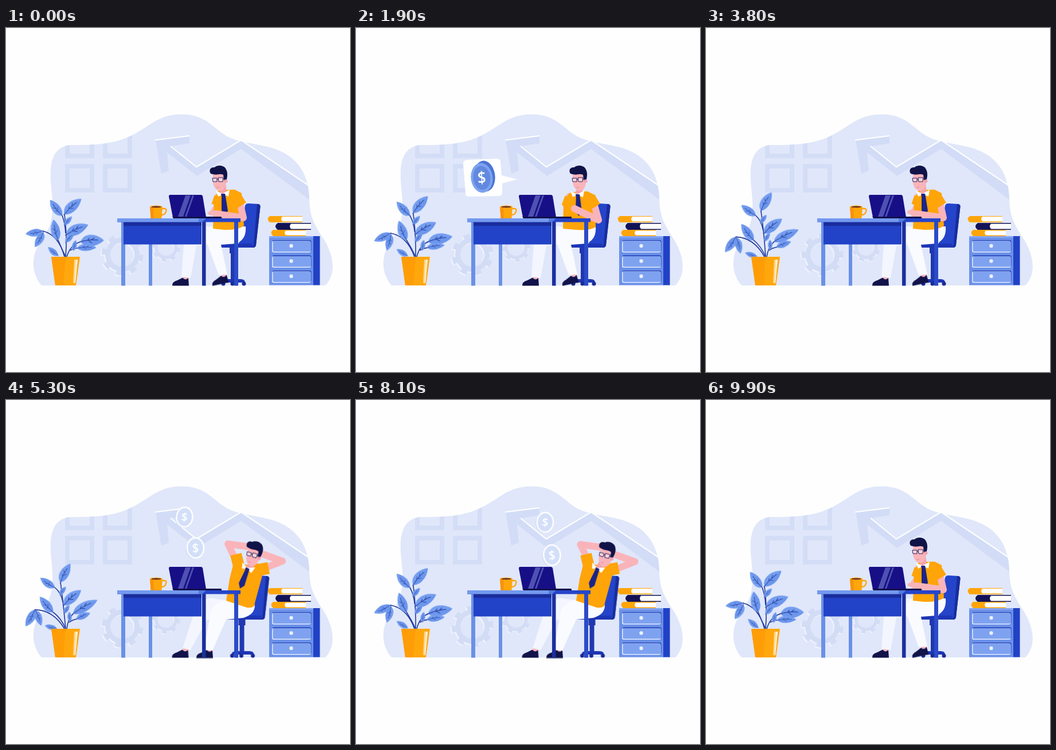
An HTML page without scripts for the animation above (10000 ms loop, 600 px wide and 600 px high).

```html
<!DOCTYPE html>
<html lang="en">
<head>
<meta charset="utf-8">
<title>Office desk</title>
<style>
html, body { margin: 0; width: 100%; height: 100%; overflow: hidden; background: #fefefe; }
svg { display: block; width: 100vw; height: 100vh; }
text { font-family: "Open Sans", Lato, sans-serif; font-weight: 600; text-anchor: middle; fill: #fff; }

/* a = typing, b = thinking, c = leaning back */
.shape { animation: shape 10s ease-in-out infinite; }
.move { animation: move 10s ease-in-out infinite; }
@keyframes shape {
  0%, 12%, 37%, 43%, 95%, to { d: var(--a); }
  16%, 33% { d: var(--b, var(--a)); }
  48%, 90% { d: var(--c); }
}
@keyframes move {
  0%, 12%, 37%, 43%, 95%, to { transform: var(--a, translate(0) rotate(0)); }
  16%, 33% { transform: var(--b, var(--a, translate(0) rotate(0))); }
  48%, 90% { transform: var(--c); }
}
.drift { animation: drift 10s ease-in-out infinite; }
@keyframes drift {
  0%, 50%, 95%, to { transform: none; }
  81%, 90% { transform: translate(4.5px, 1px); }
}
.typing { animation: typing 10s linear infinite; }
@keyframes typing {
  0%, 12%, 37%, 43%, 95%, to { opacity: 1; }
  13%, 36%, 44%, 94% { opacity: 0; }
}
.finger { animation: finger .2s ease-in-out infinite alternate; }
.finger + .finger { animation-delay: -.2s; }
@keyframes finger { to { transform: translate(-1px, -2px); } }
.tap { transform-origin: 317px 446px; animation: tap 10s ease-in-out infinite; }
@keyframes tap {
  0%, 53%, 61%, 69%, 77%, 81%, 90%, to { transform: none; }
  57%, 65%, 73%, 86% { transform: rotate(28deg); }
}

.sway, .stem { animation: sway 5s cubic-bezier(.37, 0, .63, 1) infinite alternate; }
.stem { animation-name: bend; }
@keyframes sway { from { transform: var(--a); } to { transform: var(--b); } }
@keyframes bend { from { d: var(--a); } to { d: var(--b); } }

.spin { animation: spin 10s linear infinite; }
.back { animation-direction: reverse; }
@keyframes spin { to { transform: rotate(90deg); } }

.bubble { transform-origin: 280px 264px; animation: bubble 10s ease-out infinite; }
@keyframes bubble {
  0%, 13%, 37%, to { transform: scale(0); }
  16.5%, 34% { transform: scale(1); }
}
.turn { animation: turn 1s ease-in-out infinite alternate; }
@keyframes turn { from { transform: scaleX(.9); } to { transform: scaleX(1); } }

.coin { opacity: 0; animation: rise 10s linear infinite; }
@keyframes rise {
  0% { opacity: 0; transform: translate(var(--x), 296px) scale(.6) rotate(-8deg); }
  1.5% { opacity: 1; transform: translate(calc(var(--x) + var(--dx) * .136), 278.8px) scale(1.05) rotate(-5deg); }
  9% { opacity: 1; }
  11%, to { opacity: 0; transform: translate(calc(var(--x) + var(--dx)), 170px) scale(.98) rotate(10deg); }
}
</style>
</head>
<body>
<svg viewBox="0 0 600 600">
<defs>
  <path id="blob" d="M62 449C48 433 45 413 50 394C56 372 76 360 80 328C84 296 76 275 78 246C80 220 92 204 116 204C152 204 186 204 220 187C250 172 266 150.500 306 150.500C352 150.500 362 178 390 191C418 204 456 201 487 219C516 236 528 264 529 298C530 330 537 340 550 362C570 390 579 426 557 449Z"/>
  <clipPath id="clip"><use href="#blob"/></clipPath>
  <g id="gear" fill="none">
    <circle r="25.500" stroke-width="9"/>
    <circle r="32.500" stroke-width="8" pathLength="16" stroke-dasharray=".9 1.1"/>
  </g>
  <g id="leaf">
    <path d="M0 0C6-13 26-13 40 0C28 9 10 11 0 0Z" fill="#759eef"/>
    <path d="M0 0Q20-3 40 0C28 9 10 11 0 0Z" fill="#6c96ec"/>
    <path d="M-2 0Q14-3 30-1M11-1L16-5M19-2L24-5M14-1L19 3" fill="none" stroke="#213a9c"/>
  </g>
  <g id="shoe">
    <path d="M309 431L318 433L318 442L309 442Z" fill="#f9b4ba"/>
    <path d="M290 449.500Q289 443 299 440L308 435.500Q313 441 318 436L319 449.500Z" fill="#11134a"/>
  </g>
  <g id="drawer">
    <rect x="464.500" y="370" width="68" height="20" rx="3" fill="#2540b4"/>
    <rect x="464" y="371.500" width="67.500" height="20" rx="3" fill="#e3ecfe"/>
    <rect x="465.500" y="371.500" width="66" height="18.500" rx="2" fill="#7fa2f0"/>
    <circle cx="497.500" cy="380" r="3.200" fill="#e9f0ff"/>
  </g>
  <g id="money">
    <ellipse cx="-1.500" cy="1" rx="14.500" ry="17.500" fill="#c5d3f4"/>
    <ellipse rx="14" ry="17" fill="#d3dff8" stroke="#fff" stroke-width="2.400"/>
    <text y="7" font-size="20">$</text>
  </g>
</defs>

<rect width="600" height="600" fill="#fefefe"/>
<use href="#blob" fill="#e0e7fa"/>
<g clip-path="url(#clip)">
  <g fill="none" stroke="#d3ddf6" stroke-width="8">
    <rect x="107" y="241" width="43" height="42"/>
    <rect x="173" y="241" width="43" height="42"/>
    <rect x="107" y="181" width="43" height="42"/>
    <rect x="173" y="181" width="43" height="42"/>
  </g>
  <path d="M261 196L320 189V201L290 206L332 243L410 196L530 276V300L410 211L333 258L281 217L284 249L271 254Z" fill="#d2dcf6"/>
  <path d="M260 195.500L320 188M287 206L332 242.500L410 195.500L530 276" fill="none" stroke="#fff" stroke-width="2.200"/>
</g>
<g transform="translate(201.500 397)" stroke="#f4f7ff"><use class="spin" href="#gear"/></g>
<g transform="translate(203 395.500)" stroke="#d3dcf5"><use class="spin" href="#gear"/></g>
<g transform="translate(278 384) scale(.68)" stroke="#f4f7ff"><use class="spin back" href="#gear"/></g>
<g transform="translate(279 383) scale(.68)" stroke="#d3dcf5"><use class="spin back" href="#gear"/></g>

<!-- cabinet and books -->
<rect x="459" y="363" width="78" height="85.500" fill="#6a90e8"/>
<rect x="459" y="363" width="78" height="3" fill="#82a5f2"/>
<rect x="536" y="363" width="11.500" height="85.500" fill="#2141c6"/>
<use href="#drawer"/><use href="#drawer" y="26.500"/><use href="#drawer" y="53"/>
<g fill="#ffa50a">
  <path d="M460 328H517V330H483V337H517V339H460Q453 333 460 328Z"/>
  <path d="M482 329H517V337.500H482Q478 333 482 329Z" fill="#fff"/>
  <path d="M474 340H532V342H500V350H532V352H474Q466 346 474 340Z" fill="#121357"/>
  <path d="M497 341.500H532V350.500H497Q493 346 497 341.500Z" fill="#fff"/>
  <path d="M466 352H523V354H490V361H523V363H466Q459 357 466 352Z"/>
  <path d="M488 353.500H523V361.500H488Q484 357 488 353.500Z" fill="#fff"/>
</g>

<!-- plant -->
<g fill="none" stroke="#213a9c" stroke-width="1.600">
  <path class="stem" style="--a:path('M104 399Q107 362 102 325');--b:path('M104 399Q100 355 95 318')"/>
  <path class="stem" style="--a:path('M104 358Q103 340 98 327');--b:path('M99 352Q96 336 85 327')"/>
  <path class="stem" style="--a:path('M104 399Q97 385 91 370');--b:path('M104 399Q96 380 82 370')"/>
  <path class="stem" style="--a:path('M102 399Q92 361 64 354');--b:path('M102 399Q82 366 50 366')"/>
  <path class="stem" style="--a:path('M106 399Q112 378 130 373');--b:path('M106 399Q108 382 117 373')"/>
  <path class="stem" style="--a:path('M112 388Q116 385 124 384');--b:path('M110 388Q116 383 124 382')"/>
</g>
<use href="#leaf" class="sway" style="--a:translate(102px,325px) rotate(-43deg);--b:translate(95px,318px) rotate(-63deg) scale(.92)"/>
<use href="#leaf" class="sway" style="--a:translate(98px,327px) rotate(-128deg) scale(.86);--b:translate(85px,327px) rotate(-147deg) scale(.76)"/>
<use href="#leaf" class="sway" style="--a:translate(91px,370px) rotate(-103deg) scale(.92);--b:translate(82px,370px) rotate(-131deg) scale(.88)"/>
<use href="#leaf" class="sway" style="--a:translate(102px,344px) rotate(-50deg) scale(.5);--b:translate(94px,340px) rotate(-55deg) scale(.44)"/>
<use href="#leaf" class="sway" style="--a:translate(105px,361px) rotate(-25deg) scale(1.06);--b:translate(101px,358px) rotate(-42deg)"/>
<use href="#leaf" class="sway" style="--a:translate(104px,374px) rotate(-48deg) scale(.55);--b:translate(102px,372px) rotate(-60deg) scale(.42)"/>
<use href="#leaf" class="sway" style="--a:translate(130px,373px) rotate(-4deg) scale(1.02,1.15);--b:translate(117px,373px) rotate(-30deg) scale(1.22,.95)"/>
<use href="#leaf" class="sway" style="--a:translate(124px,384px) rotate(-2deg) scale(.84,.7);--b:translate(123px,382px) rotate(-24deg) scale(.65)"/>
<use href="#leaf" class="sway" style="--a:translate(118px,388px) rotate(-78deg) scale(.46);--b:translate(112px,386px) rotate(-96deg) scale(.42)"/>
<use href="#leaf" class="sway" style="--a:translate(64px,354px) rotate(170deg) scale(.76);--b:translate(50px,366px) rotate(118deg) scale(.82)"/>
<use href="#leaf" class="sway" style="--a:translate(65px,356px) rotate(119deg) scale(.75);--b:translate(51px,367px) rotate(68deg) scale(.72)"/>
<use href="#leaf" class="sway" style="--a:translate(91px,397px) rotate(-140deg) scale(.58);--b:translate(88px,398px) rotate(-168deg) scale(.52)"/>
<path d="M79 399H129L122 449H86Z" fill="#ffa70c"/>
<path d="M79 399H104L100 449H86Z" fill="#ff9d07"/>
<path d="M119 404H125L121 445H117Z" fill="#ffd58c"/>
<path d="M122 404H125L121 445H119.500Z" fill="#fff0d5"/>

<!-- speech bubble -->
<g class="bubble">
  <path d="M194 230L246 228Q252 228 252 234L254 257L281 264L255 271L255 287Q255 293 249 293L197 294Q191 294 191 288L187 237Q187 230 194 230Z" fill="#fff"/>
  <g transform="translate(221 260)"><g class="turn">
    <ellipse cx="4" cy="-1" rx="20" ry="27" fill="#4c74d6" transform="rotate(-10)"/>
    <ellipse cx="-2" cy="1" rx="21" ry="26" fill="#7ca3f0" transform="rotate(-10)"/>
    <ellipse cx="-2" cy="1" rx="16.500" ry="21" fill="#6289df" transform="rotate(-10)"/>
    <text x="-2" y="11" font-size="29" transform="rotate(-4)">$</text>
  </g></g>
</g>

<!-- coins -->
<use href="#money" class="coin" style="--x:318px;--dx:-9px;animation-delay:4.5s"/>
<use href="#money" class="coin" style="--x:328px;--dx:8px;animation-delay:4.97s"/>
<use href="#money" class="coin" style="--x:325px;--dx:15px;animation-delay:5.35s"/>
<use href="#money" class="coin" style="--x:335px;--dx:25px;animation-delay:5.73s"/>
<use href="#money" class="coin" style="--x:304px;--dx:-20px;animation-delay:6.12s"/>
<use href="#money" class="coin" style="--x:330px;--dx:15px;animation-delay:6.32s"/>
<use href="#money" class="coin" style="--x:315px;--dx:-15px;animation-delay:6.75s"/>
<use href="#money" class="coin" style="--x:330px;--dx:15px;animation-delay:7s"/>
<use href="#money" class="coin" style="--x:324px;--dx:9px;animation-delay:7.38s"/>
<use href="#money" class="coin" style="--x:339px;--dx:14px;animation-delay:7.88s"/>
<use href="#money" class="coin" style="--x:320px;--dx:-20px;animation-delay:8.25s"/>

<!-- chair -->
<g class="move" style="--c:translate(15.5px,0) rotate(0)">
  <path d="M417 310Q418 306 423 306L440 307Q444 308 443.500 312L436 379Q435 383 431 383L405 382Z" fill="#2444ca"/>
  <path d="M438 307L440 307Q444 308 443.500 312L436 379Q435 383 431 383H428Q431 382 432 378Z" fill="#182c9b"/>
  <rect x="366" y="376" width="64" height="7" rx="3" fill="#1d36b4"/>
  <path d="M390 383H402V393H400V440H392V393H390Z" fill="#2038b0"/>
  <path d="M378 444Q378 438 386 438H409Q417 438 417 444Z" fill="#1d36b4"/>
  <g fill="#1a2a90"><circle cx="379" cy="446" r="3.500"/><circle cx="395" cy="446" r="3.500"/><circle cx="415" cy="446" r="3.500"/></g>
</g>

<!-- man -->
<g class="move" style="--c:translate(-.5px,0) rotate(0)"><use class="tap" href="#shoe"/></g>
<use href="#shoe" class="move" style="transform-origin:291px 449px;--a:translate(70px,0) rotate(-12deg);--c:translate(42px,.5px) rotate(0deg)"/>
<path class="shape" fill="#f3f6fe" style="--a:path('M400 348L330 345Q312 348 311 365L306 434L322 436L332 380L400 372Z');--c:path('M420 356L356 345Q334 352 329 368L308 433L322 436L350 384L410 372Z')"/>
<path class="shape" fill="#fafbff" style="--a:path('M418 346L362 347Q345 352 348 368L371 431L386 430L375 378L402 376Q420 368 418 346Z');--c:path('M434 358L385 348Q360 355 357 370L345 436L360 437L384 383L414 380Q434 374 434 358Z')"/>

<g class="drift" fill="none" stroke="#f9b4ba" stroke-width="12" stroke-linejoin="round" stroke-linecap="round">
  <path class="shape" style="--a:path('M370 294L368 312L362 321');--b:path('M372 294L367 310L373 322');--c:path('M402 282L387 251L424 256')"/>
</g>
<path class="shape" fill="none" stroke="#ffa409" stroke-width="20" style="--a:path('M373 295L368 310');--b:path('M374 296L368 312');--c:path('M407 294L401 269')"/>
<path class="shape" fill="#ffa409" style="--a:path('M370 284C378 282 392 282 399 282L411 288L415 345Q404 353 380 352L361 350L363 300Z');--b:path('M372 288C380 285 396 285 404 285L418 292L418 347Q408 354 384 352L361 350L362 302Z');--c:path('M398 280C412 288 426 290 438 285L452 288L434 354Q435 364 420 362L384 350L390 312Z')"/>
<path class="shape" fill="none" stroke="#f3a3ad" stroke-width="11" style="--a:path('M378 273L379 290');--b:path('M393 274L387 291');--c:path('M432 278L424 294')"/>
<g class="move" style="transform-origin:378px 289px;--b:translate(8px,1px) rotate(2deg);--c:translate(43px,4px) rotate(26deg)">
  <path d="M366 284L378 289L390 282L388 294L379 290L370 294Z" fill="#fff"/>
  <path d="M375 289H382L383 294L387 319L382 327L376 319L376 294Z" fill="#1b2488"/>
</g>
<g class="drift">
  <path class="shape" fill="none" stroke="#f9b4ba" stroke-width="12" stroke-linejoin="round" stroke-linecap="round" style="--a:path('M407 300L414 331L366 324');--b:path('M414 302L423 335L381 315');--c:path('M449 294L482 281L440 266')"/>
</g>
<path class="shape" fill="none" stroke="#ffa409" stroke-width="21" style="--a:path('M400 294L410 310');--b:path('M407 296L417 312');--c:path('M438 297L458 293')"/>
<g class="typing" fill="#f9b4ba">
  <ellipse class="finger" cx="359" cy="323" rx="7" ry="4"/>
  <ellipse class="finger" cx="365" cy="326" rx="8" ry="4"/>
</g>
<g class="drift"><g class="move" style="transform-origin:372px 262px;--b:translate(17px,0) rotate(0deg);--c:translate(60px,6px) rotate(17deg)">
  <path d="M361 251H381L384 268C384 276 380 284 374 284C366 284 361 276 361 268Z" fill="#f9b4ba"/>
  <path d="M357 254C353 248 357 242 364 243C369 238 380 240 383 245C388 252 386 263 383 269L380 265L379 256C373 253 368 258 357 254Z" fill="#101348"/>
  <circle cx="383.500" cy="267" r="3" fill="#f3a3ad"/>
  <path d="M360 262H368V268H361ZM370 261H378.500L378 268H371Z" fill="#fbd5da"/>
  <path d="M360 262H368V268H361ZM370 261H378.500L378 268H371ZM368 264H370M378.500 263L384 264" fill="none" stroke="#20215f"/>
  <path d="M367 278H372" stroke="#e58995"/>
</g></g>

<!-- laptop, mug, desk -->
<path d="M286 291H340Q342 291 343 293L349 330H291L284 294Q284 291 286 291Z" fill="#170f86"/>
<path d="M313 292H322L309 329H300ZM325 292H328L315 329H312Z" fill="#7f88d8" opacity=".55"/>
<path d="M290 329H374Q377 329 376 332H292Z" fill="#11104f"/>
<path d="M272 315H276Q281 315 279 320Q278 326 271 326" fill="none" stroke="#ffa50a" stroke-width="2.300"/>
<path d="M251 311H273L271.500 332H252.500Z" fill="#ffa60b"/>
<path d="M251 311H257L258 332H252.500Z" fill="#f9920a"/>
<ellipse cx="262" cy="311.500" rx="11" ry="2.200" fill="#ffc04d"/>
<ellipse cx="262" cy="312" rx="9" ry="1.500" fill="#6b2f18"/>
<g fill="#6a90e6">
  <rect x="249" y="376" width="6" height="73.500"/>
  <rect x="201" y="338" width="7" height="111.500"/>
  <rect x="398" y="338" width="7" height="111.500" fill="#2b4bc8"/>
  <rect x="342" y="338" width="6.500" height="111.500" fill="#1b2f9f"/>
  <rect x="205" y="338" width="136" height="39.500" fill="#2242c7"/>
  <rect x="205" y="338" width="136" height="7" fill="#1a2d9c"/>
  <rect x="194" y="332" width="215" height="6.500" fill="#2545ca"/>
  <rect x="194" y="332" width="142" height="6.500" fill="#7399ee"/>
  <path d="M336 332H349L342 338.500H336Z" fill="#5279dc"/>
</g>
</svg>
</body>
</html>
```
